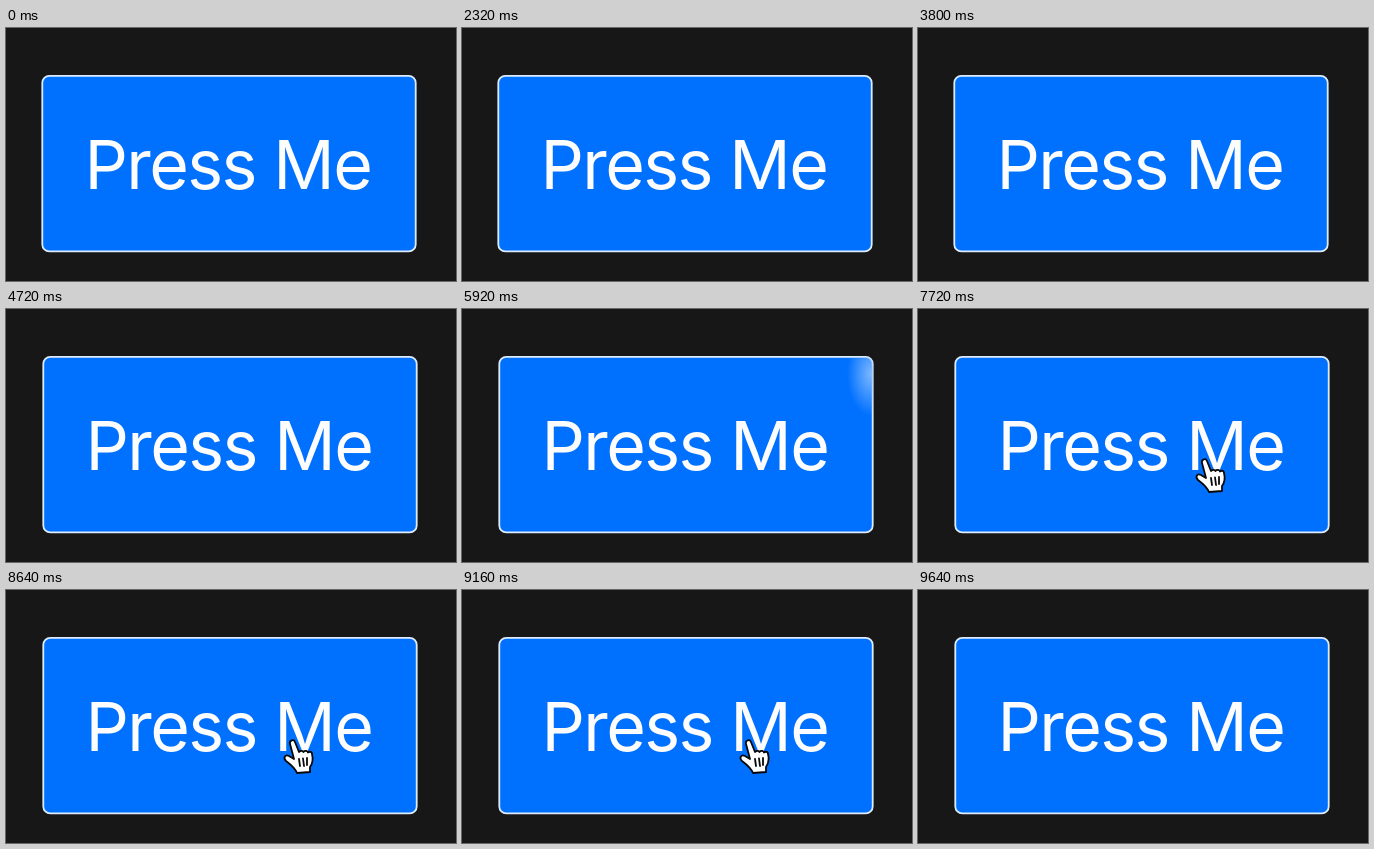
Write an HTML page that moves like this. It is 450 by 253 pixels and loops after 9680 ms.

```html
<!DOCTYPE html>
<html>
<head>
<meta charset="utf-8">
<style>
  html, body { margin: 0; width: 100%; height: 100%; overflow: hidden; background: #181718; }
  svg { display: block; width: 100vw; height: 100vh; }
  text { font: 400 68px Inter, sans-serif; letter-spacing: -1.6px; }
</style>
</head>
<body>
<svg viewBox="0 0 450 253">
  <defs>
    <radialGradient id="shine">
      <stop offset="0" stop-color="#9ccaff" stop-opacity=".8"/>
      <stop offset="1" stop-color="#9ccaff" stop-opacity="0"/>
    </radialGradient>
    <clipPath id="face"><rect x="37" y="48" width="373" height="175" rx="7"/></clipPath>
  </defs>
  <g id="button">
    <rect id="box" x="36.3" y="47.8" width="373.4" height="175.6" rx="7" stroke-width="1.8"/>
    <g clip-path="url(#face)">
      <ellipse id="glow" cx="408" cy="65" rx="24" ry="42" fill="url(#shine)"/>
    </g>
    <text id="label" x="78.5" y="161">Press Me</text>
  </g>
  <circle id="ring" cx="288" cy="150" r="59.5" fill="none" stroke="#0b0b0b" stroke-width="3"/>
  <g id="hand" fill="#fff" stroke="#080808" stroke-width="1.8" stroke-linejoin="round" stroke-linecap="round">
    <path d="M-3 3C-4-1 1-2 2 1L6 11C8 9 10 10 10.5 11C12 9 14.5 10 15 11.5C17 10 19 11 19 13C20 17 20 22 17 26V31L4 32C2 27-3 23-7 20C-10 17-8 13-4 15L1 18Z"/>
    <path d="M6 18l1 7M10 17.5l1 7.5M14 17v7" fill="none"/>
  </g>
</svg>
<script>
const LOOP = 9680;
const el = id => document.getElementById(id);
const set = (id, attrs) => Object.entries(attrs).forEach(([k, v]) => el(id).setAttribute(k, v));
const ramp = (t, from, to) => Math.min(1, Math.max(0, (t - from) / (to - from)));
const ease = p => p * p * (3 - 2 * p);
const pulse = (t, start, end, fade) => ramp(t, start, start + fade) * (1 - ramp(t, end, end + fade));
const mix = (a, b, p) => `rgb(${a.map((v, i) => Math.round(v + (b[i] - v) * p))})`;
const BLUE = [0, 112, 255], WHITE = [253, 253, 253], EDGE = [222, 235, 250];

function draw(t) {
  const press = pulse(t, 6960, 7560, 120);
  const arrive = ease(ramp(t, 6000, 6720));
  const x = 410 + (287 - 410) * arrive;
  const y = -30 + 181 * arrive;

  set('button', { transform: `translate(${ramp(t, 3900, 4100)} 0)` });
  set('box', { fill: mix(BLUE, WHITE, press), stroke: mix(EDGE, BLUE, press) });
  set('label', { fill: mix(WHITE, BLUE, press) });
  set('glow', { opacity: pulse(t, 5840, 6040, 80) });
  set('ring', { opacity: press });
  set('hand', {
    transform: `translate(${x} ${y})`,
    opacity: t < 6000 ? 0 : 1 - ramp(t, 9160, 9400)
  });
}

function tick() {
  draw(performance.now() % LOOP);
  requestAnimationFrame(tick);
}
tick();
</script>
</body>
</html>
```
